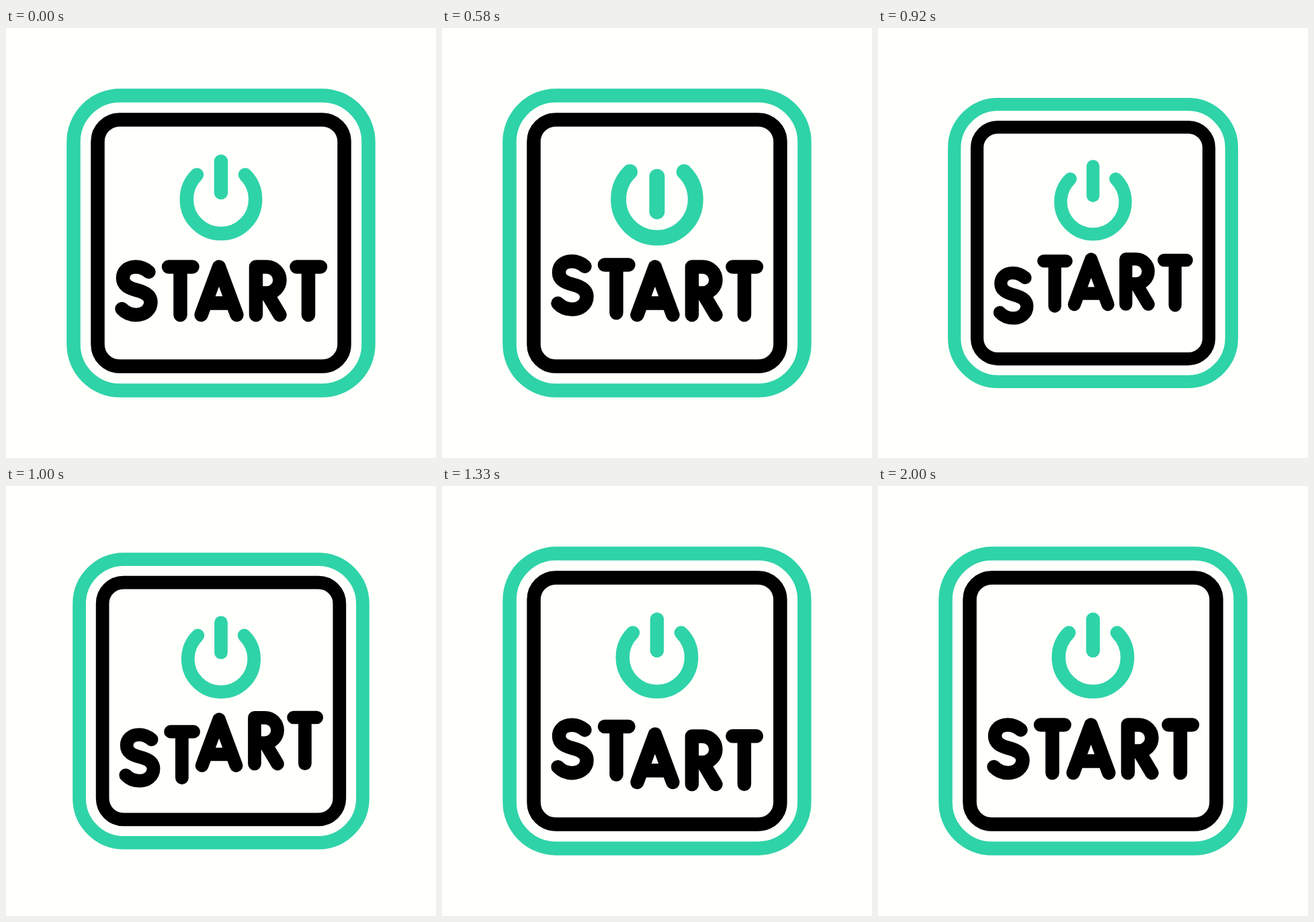
An HTML page that plays this animation: 640 px wide and 640 px high, repeating every 2080 ms.

```html
<!DOCTYPE html>
<html lang="en">
<head>
<meta charset="utf-8">
<title>Start button</title>
<style>
  html, body { margin: 0; width: 100%; height: 100%; overflow: hidden; background: #fffffb; }
  svg { display: block; width: 100vw; height: 100vh; }
  g { fill: none; stroke: #000; stroke-width: 20.5; stroke-linecap: round; stroke-linejoin: round; }
  .green { stroke: #2fd3a8; }
</style>
</head>
<body>
<svg viewBox="0 0 640 640" role="img" aria-label="START">
  <g id="button">
    <rect class="green" x="100.5" y="100.5" width="439" height="439" rx="69"/>
    <rect x="136.5" y="136.5" width="367" height="367" rx="32.5"/>
    <g id="power" class="green">
      <path d="M284 218.5A51.2 51.2 0 1 0 356 218.5"/>
      <path id="bar" d="M320 198.5V245"/>
    </g>
    <g id="word">
      <path d="M212.5 363C206 357.5 200 355.5 193 355.5C181 355.5 174 363 174 372C174 383 183 387 194 390C206 393 215.5 398 215.5 408C215.5 420 205 427 194 427C185 427 178 424 172.5 418"/>
      <path d="M242 355.5H277.5M259.5 355.5V427"/>
      <path d="M290.5 427L317 355.5L343.5 427M304 409.5H330"/>
      <path d="M372 427V355.5H388a19.5 19.5 0 0 1 0 39H372M389 396L407.5 427"/>
      <path d="M432.5 355.5H468M450 355.5V427"/>
    </g>
  </g>
</svg>
<script>
const LOOP = 2080, STEPS = 25;
const starts = Array.from({ length: STEPS }, (_, i) => Math.round(i * 25 / 3) * 10);

// Each track: first step, then one value per step; outside it the part rests.
const track = (first, rest, values) => i => values[i - first] ?? rest;

const buttonScale = track(8, 1, [.967, .925, .926, .94, .961, .98, .992, .998, .9995]);
const powerScale = track(1, 1, [1.01, 1.04, 1.08, 1.11, 1.12, 1.12, 1.12, 1.08, 1.02, 1.003]);
const barDrop = track(5, 0, [3, 16, 26.3, 18, 4.5, .5]);
const letterHop = track(6, 0, [-3, -8.3, -10, -9.7, -7, 12, 16.7, 17, 14, 2.5, .2]);

const el = id => document.getElementById(id);
const [button, power, bar] = ["button", "power", "bar"].map(el);
const letters = [...el("word").children];

const shift = (node, y) => node.setAttribute("transform", `translate(0 ${y})`);
const scale = (node, s, cx, cy) =>
  node.setAttribute("transform", `translate(${cx} ${cy}) scale(${s}) translate(${-cx} ${-cy})`);

function draw(now) {
  const t = now % LOOP;
  const step = starts.findLastIndex(s => s <= t);
  scale(button, buttonScale(step), 320, 320);
  scale(power, powerScale(step), 320, 255);
  shift(bar, barDrop(step));
  // The hop runs along the word, one step per letter.
  letters.forEach((letter, n) => shift(letter, letterHop(step - n)));
}

const begin = performance.now();
function tick() {
  draw(performance.now() - begin);
  requestAnimationFrame(tick);
}
tick();
</script>
</body>
</html>
```
